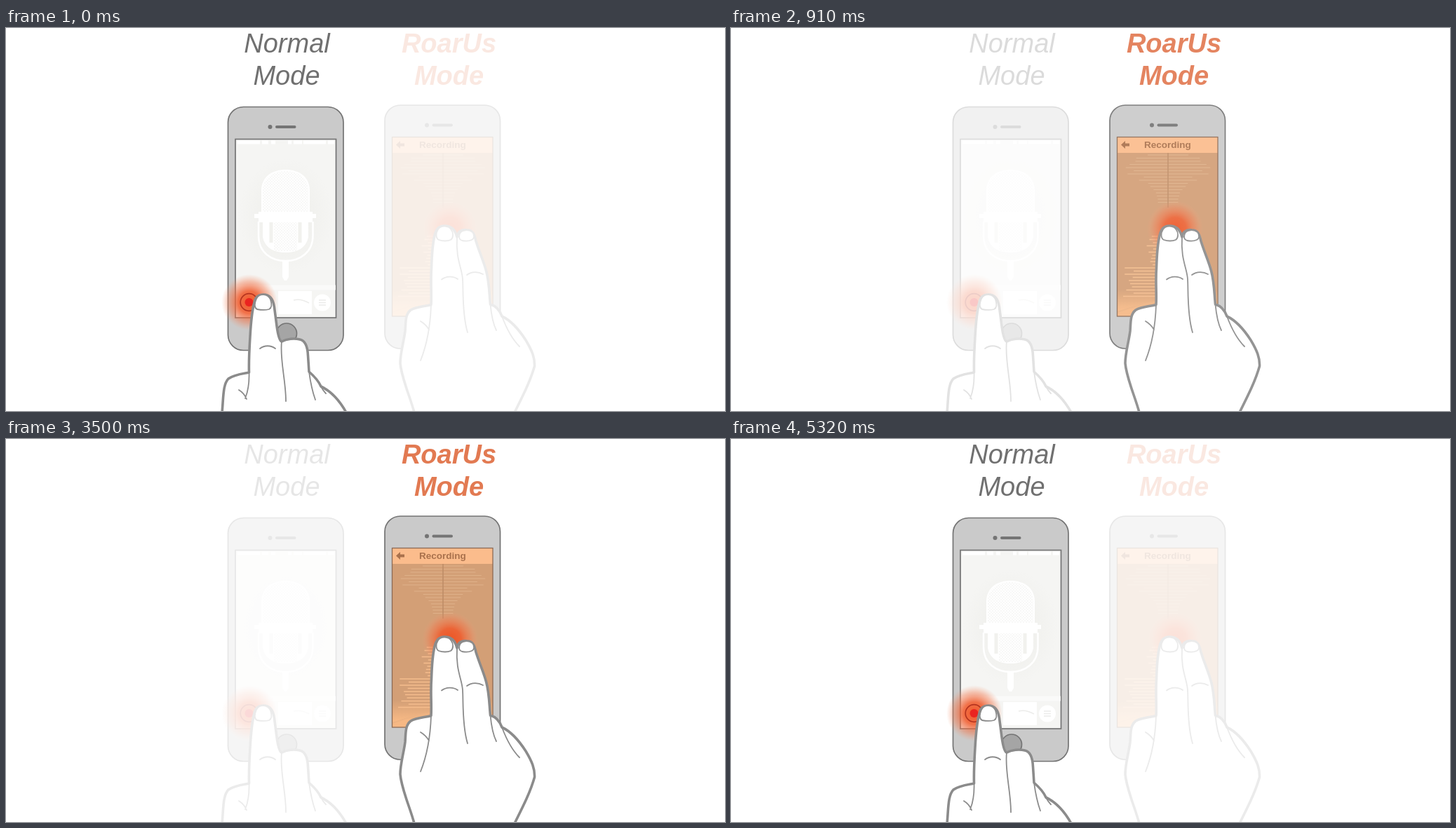
An HTML page that plays this animation: 1025x546 px, repeating every 5390 ms.

```html
<!DOCTYPE html>
<html lang="en">
<head>
<meta charset="utf-8">
<title>Recording modes</title>
<style>
html, body { margin: 0; width: 100%; height: 100%; overflow: hidden; background: #fff; }
svg { display: block; width: 100vw; height: 100vh; }
text { font-family: "Liberation Sans", Arial, sans-serif; text-anchor: middle; }
.title { font-size: 38px; font-style: italic; fill: #707070; }
.hot { font-weight: bold; fill: #e27a52; }
.body { fill: #cacaca; stroke: #747474; stroke-width: 1.7; }
.grille { fill: none; stroke: #747474; stroke-width: 4; stroke-linecap: round; }
.skin { fill: #fff; stroke: #8b8b8b; stroke-width: 3.6; stroke-linejoin: round; }
.crease { fill: none; stroke: #8b8b8b; stroke-width: 1.8; stroke-linecap: round; }
.nail { fill: #fff; stroke: #8b8b8b; stroke-width: 1.8; }

/* 14 pictures a second, so the fades move in 70 ms steps */
#normal { animation: dim 5390ms infinite; }
#active { animation: lit 5390ms infinite; }
:root {
  --out: linear(.05 0% 12.5%, .17 12.5% 25%, .35 25% 37.5%, .55 37.5% 50%,
    .74 50% 62.5%, .89 62.5% 75%, .98 75% 87.5%, 1 87.5% 100%);
  --back: linear(.01 0% 12.5%, .07 12.5% 25%, .2 25% 37.5%, .37 37.5% 50%,
    .55 50% 62.5%, .73 62.5% 75%, .88 75% 87.5%, .97 87.5% 100%);
}
@keyframes dim {
  0% { opacity: 1; animation-timing-function: step-end; }
  10.3896% { opacity: 1; animation-timing-function: var(--out); }
  20.7792% { opacity: .17; animation-timing-function: step-end; }
  74.026% { opacity: .17; animation-timing-function: var(--back); }
  84.4156%, 100% { opacity: 1; }
}
@keyframes lit {
  0% { opacity: .17; animation-timing-function: step-end; }
  10.3896% { opacity: .17; animation-timing-function: var(--out); }
  20.7792% { opacity: 1; animation-timing-function: step-end; }
  74.026% { opacity: 1; animation-timing-function: var(--back); }
  84.4156%, 100% { opacity: .17; }
}
</style>
</head>
<body>
<svg viewBox="0 0 1025 546" preserveAspectRatio="none">
  <defs>
    <radialGradient id="glow">
      <stop offset="0" stop-color="#f0501f" stop-opacity=".95"/>
      <stop offset=".4" stop-color="#f05a2b" stop-opacity=".85"/>
      <stop offset=".75" stop-color="#f27a50" stop-opacity=".42"/>
      <stop offset="1" stop-color="#f59a78" stop-opacity="0"/>
    </radialGradient>
    <radialGradient id="halo">
      <stop offset=".5" stop-color="#f1f1ee"/>
      <stop offset="1" stop-color="#f5f5f3"/>
    </radialGradient>
    <linearGradient id="tan" x2="0" y2="1">
      <stop offset="0" stop-color="#d39f76"/>
      <stop offset=".85" stop-color="#d39f76"/>
      <stop offset=".96" stop-color="#f6b884"/>
    </linearGradient>
    <pattern id="mesh" width="4" height="4" patternUnits="userSpaceOnUse">
      <circle cx="1" cy="1" r=".7" fill="#ebebe8"/>
      <circle cx="3" cy="3" r=".7" fill="#ebebe8"/>
    </pattern>
  </defs>

  <g id="normal">
    <text class="title" x="400.5" y="35">Normal</text>
    <text class="title" x="400" y="81">Mode</text>
    <rect class="body" x="316.5" y="112.5" width="164.5" height="347" rx="22"/>
    <circle cx="376.5" cy="141" r="3" fill="#747474"/>
    <path class="grille" d="M386 141H411.5"/>
    <circle class="body" cx="400" cy="435.5" r="14.5" style="fill:#a5a5a5"/>
    <rect x="327" y="158.5" width="143.5" height="254.5" fill="#f5f5f3" stroke="#747474" stroke-width="1.7"/>
    <ellipse cx="399" cy="268" rx="68" ry="82" fill="url(#halo)"/>
    <path d="M330 163H468" stroke="#fff" stroke-width="5" stroke-dasharray="32 3 9 4 6 18 5 3 12 2"/>
    <path d="M328 370H470" stroke="#fafaf9" stroke-width="7"/>
    <g fill="#fff">
      <path id="head" d="M364 264V232C364 212 379 202 398.500 202S433 212 433 232V264Z"/>
      <path id="base" d="M366 275H431V298C428 313 416 320 398.500 320S369 313 366 298Z"/>
      <path d="M354 265H360V262H437V265H442V271H437V277H360V271H354Z"/>
      <path d="M394 332H403V355L400 360H397L394 355Z"/>
      <rect x="388" y="375" width="48" height="33"/>
      <circle cx="451" cy="391.500" r="12"/>
    </g>
    <path d="M366 232C366 214 380 204 398.500 204S431 214 431 232V262H366ZM382 277H415V318H382Z" fill="url(#mesh)"/>
    <path d="M378 277V306M419 277V306" stroke="#f1f1ee" stroke-width="5"/>
    <path d="M360 276V296C360 320 378 332 398.500 332S437.500 320 437.500 296V276" fill="none" stroke="#fff" stroke-width="2.500"/>
    <path d="M446 388H456M446 391.500H456M446 395H456M410 388C417 386 425 388 432 392" fill="none" stroke="#ececea" stroke-width="1.500"/>

    <circle cx="347" cy="391" r="40" fill="url(#glow)"/>
    <circle cx="346.500" cy="391" r="12.300" fill="none" stroke="#b5341f" stroke-width="1.700"/>
    <circle cx="346.500" cy="391" r="6" fill="#ea2420"/>

    <path class="skin" d="M308 548C310 528 309 508 317 500C325 494 336 493 346.500 491C346 474 347 456 348 440C349 422 351 402 354 391C356 382 361 380 367 380C377 380 381 387 382.500 398L386 425C388 440 390 446 393 447C400 443 411 442 419 444C428 446 430 456 430.500 467L432 490C440 497 446 504 449 511C464 518 475 530 485 548"/>
    <path class="crease" d="M346.500 491C347 505 345 518 341 528M332 516C337 519 341 524 343 529M362 457C368 452 378 452 384 457M393 447C390 472 399 502 399 532M432 490C434 505 437 519 441 530M449 511C451 515 453 518 456 521"/>
    <path class="nail" d="M357 386C354 393 354 399 358 401C363 402 371 402 375 401C379 399 379 393 377 387C373 378 361 378 357 386Z"/>
  </g>

  <g id="active">
    <text class="title hot" x="631.500" y="35">RoarUs</text>
    <text class="title hot" x="631.500" y="81">Mode</text>
    <rect class="body" x="540" y="110" width="164.500" height="347" rx="22"/>
    <circle cx="600" cy="138.500" r="3" fill="#747474"/>
    <path class="grille" d="M609.500 138.500H635"/>
    <rect x="550.500" y="155.500" width="143.500" height="255.500" fill="url(#tan)"/>
    <rect x="550.500" y="155.500" width="143.500" height="22.500" fill="#fbbc8c"/>
    <path id="waves" fill="none" stroke="#dfb189" stroke-width="1.200"/>
    <path id="bars" fill="none" stroke="#f5bd8d" stroke-width="1.600"/>
    <path d="M623 178V256" stroke="#bd8b66" stroke-width="1.500"/>
    <path d="M551 405C570 398 588 393 608 390" fill="none" stroke="#eeb382" stroke-width="2"/>
    <rect x="550.500" y="155.500" width="143.500" height="255.500" fill="none" stroke="#8c6a55" stroke-width="1.300"/>
    <path d="M556 166.500L562 161V164.500H568V168.500H562V172Z" fill="#a9714c"/>
    <text x="622.300" y="171" font-size="13.500" font-weight="bold" fill="#a9714c">Recording</text>

    <circle cx="633" cy="286" r="40" fill="url(#glow)"/>

    <path class="skin" d="M582 548C576 525 564 500 562 478C562 463 567 448 569 432C570 419 569 408 577 402C585 397 597 397 606 394.500C607 378 605 362 606.500 342C607 326 608 308 611 296C613 286 618 282 625 282C635 282 640 287 643 298C644 290 650 287 657 288C666 288 668 295 670 304C675 320 681 333 684.500 346C689 362 689 380 690.500 394C698 396 704 403 707 411C722 418 732 431 741 445C750 460 754 470 753.500 482C748 502 738 522 725 548"/>
    <path class="crease" d="M606 394.500C605 425 601 449 591 474M591 418C596 421 600 425 603 430M643 298C641 330 650 342 651 358C652 372 650 408 658 434M621 358.500C627 354 637 353 644 358M657 352C664 347 673 347 680 351M690.500 394C692 410 694 421 699 431M707 411C713 427 721 443 732 454"/>
    <path class="nail" d="M616 287C612 293 613 300 617 302C622 304 630 304 634 302C638 299 638 292 635 288C631 281 620 281 616 287Z"/>
    <path class="nail" d="M647 293C645 298 646 302 650 303C655 304 660 304 664 302C668 300 668 295 665 291C660 287 650 287 647 293Z"/>
  </g>
</svg>
<script>
const draw = (id, first, last, step, line) => {
  let d = "";
  for (let y = first; y <= last; y += step) d += line(y);
  document.getElementById(id).setAttribute("d", d);
};
const wobble = y => Math.abs(Math.sin(y * 1.7));

// faint centred strokes, widest near the second row group
draw("waves", 181, 250, 4.5, y => {
  const half = 14 + 50 * Math.exp(-(((y - 200) / 22) ** 2)) * (.55 + .45 * wobble(y));
  return `M${623 - half} ${y}h${2 * half}`;
});
// brighter strokes beside the finger, growing downwards
draw("bars", 297, 386, 4.5, y => {
  const left = y < 340 ? 592 + 10 * wobble(y) : 558 + 16 * wobble(y);
  return `M${left} ${y}H608`;
});
</script>
</body>
</html>
```
